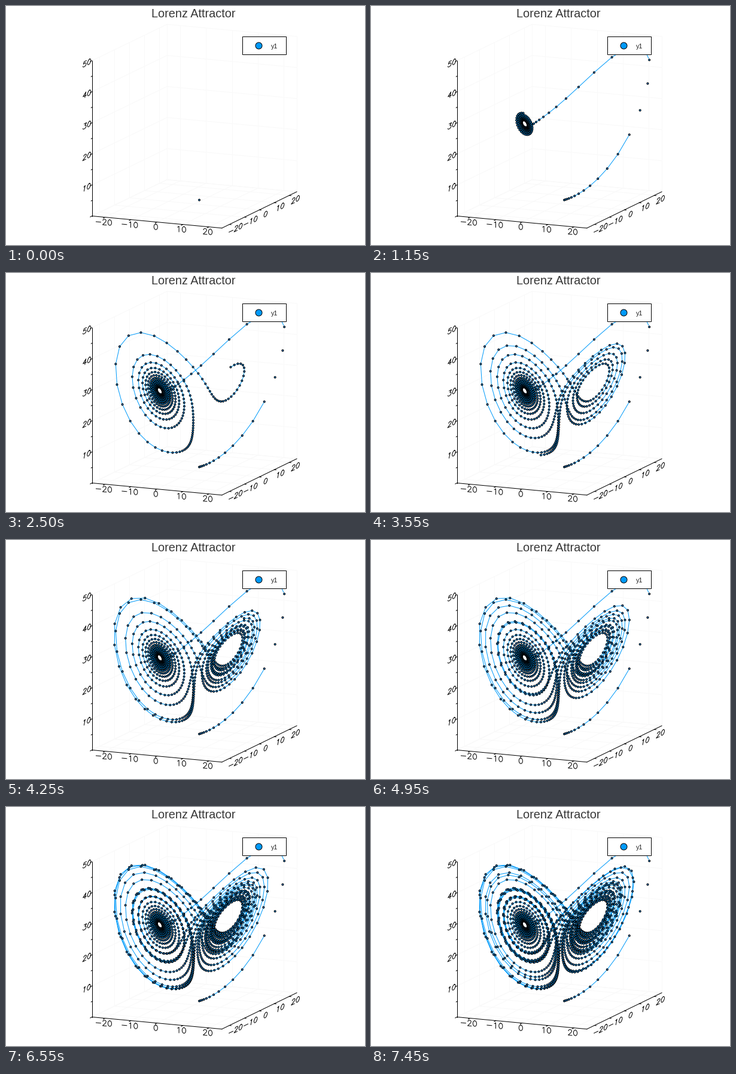
A matplotlib script that plays this animation: 600 by 400 pixels, repeating every 7.5 s.

```python
import numpy as np
import matplotlib.pyplot as plt
from matplotlib.animation import FuncAnimation
from matplotlib.patches import Rectangle

W, H, DPI = 600, 400, 100
PX = 72 / DPI
FRAMES, INTERVAL, STRIDE = 150, 50, 10
LIM = 25
BLUE, GRID = "#009AFA", "#f9f9f9"
TICKS = range(-20, 21, 10)

# Single-stroke digits on a 20 x 21 cell.
TURN = np.linspace(0, 2 * np.pi, 17)
BOWL = [(16, 11), (17, 8), (17, 6), (16, 3), (14, 1), (11, 0), (8, 0), (5, 1), (3, 4)]
GLYPHS = {
    "0": [np.c_[10 + 7 * np.sin(TURN), 10.5 + 10.5 * np.cos(TURN)]],
    "1": [[(6, 17), (8, 18), (11, 21), (11, 0)]],
    "2": [[(4, 16), (5, 19), (8, 21), (12, 21), (15, 19), (16, 17), (16, 15),
           (13, 10), (3, 0), (17, 0)]],
    "3": [[(5, 21), (16, 21), (10, 13), (13, 13)] + BOWL],
    "4": [[(13, 0), (13, 21), (3, 7), (18, 7)]],
    "5": [[(15, 21), (5, 21), (4, 12), (8, 14), (11, 14), (14, 13)] + BOWL],
    "-": [[(4, 9), (22, 9)]],
}


def project(x, y, z):
    """Parallel projection of data space to stage pixels."""
    u, v = (np.asarray(x) + LIM) / 50, (np.asarray(y) + LIM) / 50
    return np.array([143.8 + 217 * u + 125.2 * v,
                     351.5 + 20.2 * u - 60.8 * v - 5.2 * np.asarray(z)])


def trajectory(n, dt=0.02, sigma=10, rho=28, beta=8 / 3):
    x = y = z = 1.0
    pts = []
    for _ in range(n):
        x += dt * (sigma * (y - x))
        y += dt * (x * (rho - z) - y)
        z += dt * (x * y - beta * z)
        pts.append((x, y, z))
    return np.array(pts)


def clipped(pts):
    """Polyline cut at y = LIM, with the vertex count reached at each point."""
    out, ends = [], []
    for i, p in enumerate(pts):
        q = pts[i - 1]
        if i and (q[1] > LIM) != (p[1] > LIM):
            out.append(q + (p - q) * (LIM - q[1]) / (p[1] - q[1]))
        out.append(p if p[1] <= LIM else np.full(3, np.nan))
        ends.append(len(out))
    return np.array(out), ends


plt.rcParams["font.family"] = "Liberation Sans"
fig = plt.figure(figsize=(W / DPI, H / DPI), dpi=DPI, facecolor="white")
ax = fig.add_axes([0, 0, 1, 1])
ax.set_xlim(0, W)
ax.set_ylim(H, 0)
ax.axis("off")


def stroke(points, color="black", z=2):
    xs, ys = np.transpose(points)
    return ax.plot(xs, ys, color=color, lw=PX, zorder=z)[0]


def segment(a, b, color="black"):
    stroke([project(*a), project(*b)], color, z=1 if color == GRID else 2)


def tick(pos, offset):
    p = project(*pos)
    stroke([p, p + offset])
    return p


def label(value, centre, along, up):
    """Stroke text centred on a point, in the plane of along and up."""
    lines, pen = [], 0
    for ch in str(value):
        lines += [np.array(g, float) + (pen, 0) for g in GLYPHS[ch]]
        pen += 26 if ch == "-" else 20
    xs = np.concatenate(lines)[:, 0]
    mid = np.array([(xs.min() + xs.max()) / 2, 10.5])
    for g in lines:
        stroke(centre + (g - mid) @ np.array([along, up]))


# Grid on the two back walls and the floor
for t in (-LIM, *TICKS, LIM):
    segment((t, LIM, 0), (t, LIM, 50), GRID)
    segment((t, -LIM, 0), (t, LIM, 0), GRID)
    segment((-LIM, t, 0), (-LIM, t, 50), GRID)
    segment((-LIM, t, 0), (LIM, t, 0), GRID)
for h in range(0, 51, 10):
    segment((-LIM, -LIM, h), (-LIM, LIM, h), GRID)
    segment((-LIM, LIM, h), (LIM, LIM, h), GRID)

# Axes, ticks and tick labels
segment((-LIM, -LIM, 0), (-LIM, -LIM, 50))
segment((-LIM, -LIM, 0), (LIM, -LIM, 0))
segment((LIM, -LIM, 0), (LIM, LIM, 0))
slant = dict(along=(0.37, -0.18), up=(0.09, -0.45))
for t in TICKS:
    p = tick((t, -LIM, 0), (-3, 1.5))
    label(t, p + (-2, 8), (0.44, 0.04), (0, -0.45))
    p = tick((LIM, t, 0), (3, 0.3))
    label(t, p + (10.5, 6.9), **slant)
for h in range(0, 51, 5):
    major = h % 10 == 0
    p = tick((-LIM, -LIM, h), (-3, 1.5) if major else (-1.5, 0.7))
    if major and h:
        label(h, p + (-8.5, 3.7), **slant)

# Title and legend
ax.text(313, 19, "Lorenz Attractor", size=19.9 * PX, color="#383838",
        ha="center", va="baseline")
ax.add_patch(Rectangle((394.5, 50.5), 73, 30, fc="white", ec="black",
                       lw=PX, zorder=6))
ax.plot(421.5, 65.5, "o", ms=11 * PX, mfc=BLUE, mec="black", mew=PX, zorder=7)
ax.text(443, 70.7, "y1", size=10.8 * PX, color="#222222", va="baseline", zorder=7)

pts = trajectory((FRAMES - 1) * STRIDE + 1)
dots = project(*pts.T).T
path, ends = clipped(pts)
path = project(*path.T)

curve = stroke(path[:, :1].T, BLUE, z=3)
# A pair of widths keeps markers at sub-pixel positions.
marks = ax.scatter(*dots[:1].T, s=(2.9 * PX) ** 2, c=BLUE, edgecolors="black",
                   linewidths=[1.1 * PX, 1.1 * PX], zorder=4)


def draw(k):
    n = k * STRIDE + 1
    curve.set_data(path[:, :ends[n - 1]])
    marks.set_offsets(dots[:n])
    return curve, marks


anim = FuncAnimation(fig, draw, frames=FRAMES, interval=INTERVAL, repeat=True,
                     init_func=lambda: draw(0))
plt.show()
```
